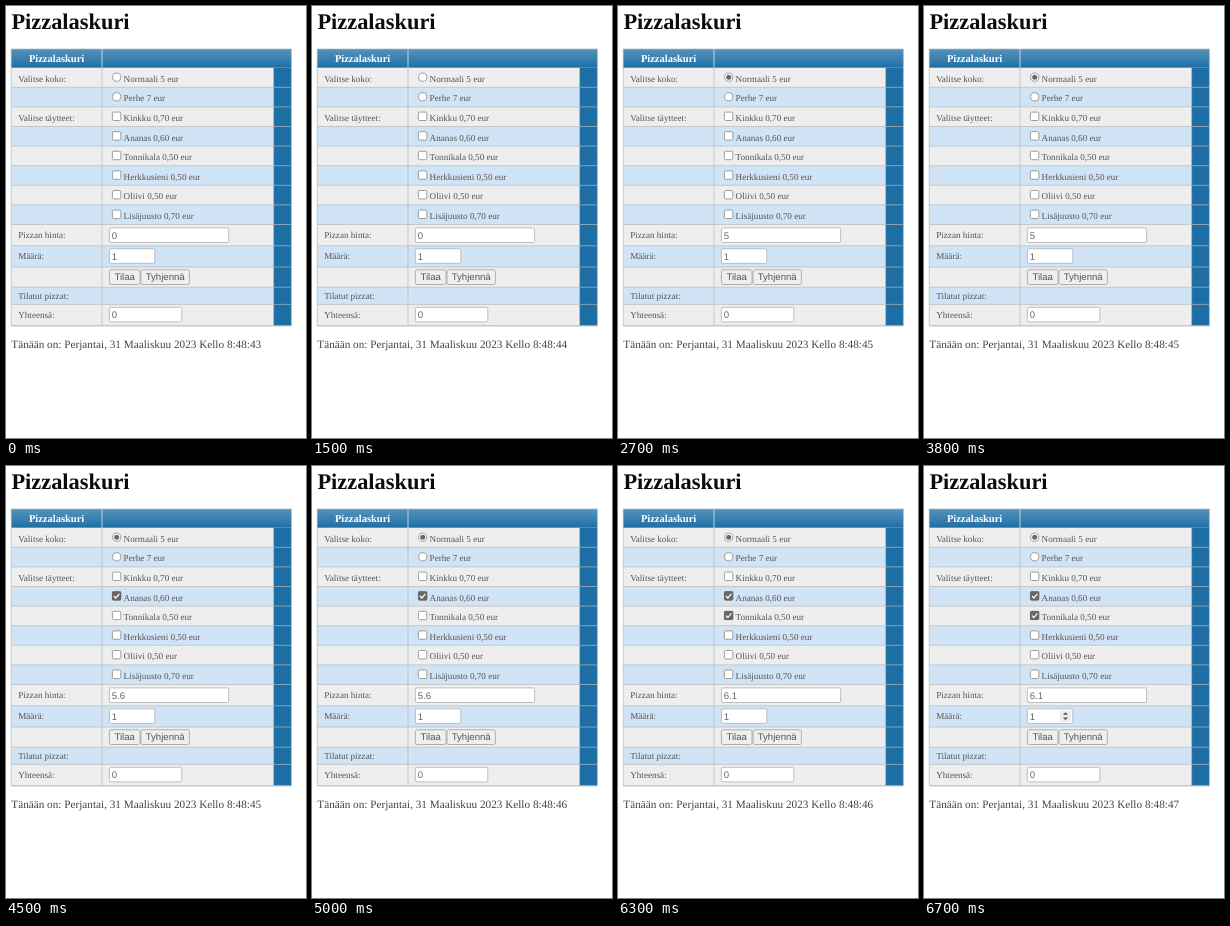
Write an HTML page that moves like this. It is 300 px wide and 432 px high and loops after 8 s.

```html
<!DOCTYPE html>
<html lang="fi">
<head>
<meta charset="utf-8">
<title>Pizzalaskuri</title>
<style>
  html, body { margin: 0; width: 100%; height: 100%; overflow: hidden; background: #fff; }
  svg { display: block; width: 300px; height: 432px; text-rendering: geometricPrecision; }
  text { font-family: "Liberation Serif", "Times New Roman", serif; fill: #555; }
  .title { font-size: 22.4px; font-weight: bold; fill: #0c0c0c; }
  .head { font-size: 10.5px; font-weight: bold; fill: #fff; text-anchor: middle; }
  .cell { font-size: 9.15px; }
  .date { font-size: 11.22px; fill: #444; }
  .field { font: 9.6px "Liberation Sans", Arial, sans-serif; fill: #666; }
  .button { font: 9.6px "Liberation Sans", Arial, sans-serif; fill: #555; text-anchor: middle; }
  .line { stroke: #b4b8bb; stroke-width: .7; fill: none; }
  .box { fill: #fff; stroke: #888; stroke-width: .8; }
  .input { fill: #fff; stroke: #b0b0b0; stroke-width: .8; }
  .press { fill: #efefef; stroke: #a0a0a0; stroke-width: .8; }
  .on { fill: #686868; }
  .tick { fill: none; stroke: #fff; stroke-width: 1.2; }
</style>
</head>
<body>
<svg viewBox="0 0 300 432">
  <defs>
    <linearGradient id="bar" x2="0" y2="1">
      <stop stop-color="#5592bb"/>
      <stop offset=".66" stop-color="#327cad"/>
      <stop offset="1" stop-color="#1c6ea4"/>
    </linearGradient>
  </defs>
  <text class="title" x="5.4" y="22.6">Pizzalaskuri</text>
  <g id="table"></g>
  <g id="spinner" visibility="hidden">
    <rect x="136" y="244.6" width="11" height="11.2" fill="#ececec"/>
    <path d="M139 248.8l2.5-2.6 2.5 2.6zM139 251.6l2.5 2.6 2.5-2.6z" fill="#555"/>
  </g>
  <text class="date" x="5.3" y="341.8">Tänään on: Perjantai, 31 Maaliskuu 2023 Kello 8:48:<tspan id="sec">43</tspan></text>
</svg>
<script>
const LOOP = 8000, TOP = 61.7, STEP = 19.6;
const LEFT = 5.2, SPLIT = 96, SIDE = 267.6, RIGHT = 285.4, BOTTOM = 319.8;
const table = document.getElementById('table');

function add(tag, attrs, content = '') {
  const el = document.createElementNS('http://www.w3.org/2000/svg', tag);
  for (const key in attrs) el.setAttribute(key, attrs[key]);
  el.textContent = content;
  table.append(el);
  return el;
}
const rect = (x, y, width, height, extra) => add('rect', { x, y, width, height, ...extra });
const label = (cls, x, y, content) => add('text', { class: cls, x, y }, content);
const path = (cls, d) => add('path', { class: cls, d });

// Table background and grid
const edges = Array.from({ length: 9 }, (_, i) => TOP + i * STEP).concat(239.8, 261, 281.2, 298.4, BOTTOM);
edges.slice(0, -1).forEach((y, i) =>
  rect(LEFT, y, SIDE - LEFT, edges[i + 1] - y, { fill: i % 2 ? '#d0e4f5' : '#eee' }));
rect(SIDE, TOP, RIGHT - SIDE, BOTTOM - TOP, { fill: '#1c6ea4' });
rect(LEFT, 43, RIGHT - LEFT, TOP - 43, { fill: 'url(#bar)' });
edges.slice(1).forEach(y => path('line', `M${LEFT} ${y}H${RIGHT}`));
path('line', `M${SPLIT} ${TOP}V${BOTTOM}M${SIDE} ${TOP}V${BOTTOM}`);
path('line', `M${LEFT} 43H${RIGHT}V${BOTTOM}H${LEFT}Z`);
rect(SPLIT - .5, 43, 1, TOP - 43, { fill: '#b9d4e8' });
label('head', 50.6, 55.5, 'Pizzalaskuri');

// Row labels
[['Valitse koko:', 75.8], ['Valitse täytteet:', 115], ['Pizzan hinta:', 232.4],
 ['Määrä:', 252.6], ['Tilatut pizzat:', 292.8], ['Yhteensä:', 311.8]]
  .forEach(([s, y]) => label('cell', 12.2, y, s));

// Options: two radios, then checkboxes
const marks = ['Normaali 5 eur', 'Perhe 7 eur', 'Kinkku 0,70 eur', 'Ananas 0,60 eur',
  'Tonnikala 0,50 eur', 'Herkkusieni 0,50 eur', 'Oliivi 0,50 eur', 'Lisäjuusto 0,70 eur'].map((s, i) => {
  const y = 71.2 + i * STEP;
  label('cell', 117.6, y + 4.6, s);
  if (i < 2) {
    add('circle', { class: 'box', cx: 110.7, cy: y, r: 4.1 });
    return [add('circle', { class: 'on', cx: 110.7, cy: y, r: 2.5 })];
  }
  rect(106.4, y - 4.3, 8.4, 8.4, { class: 'box', rx: 1.2 });
  return [rect(106, y - 4.7, 9.2, 9.2, { class: 'on', rx: 1.4 }),
    path('tick', `M107.9 ${y}l1.9 2 3.6-4.2`)];
});

// Fields and buttons
const field = (y, w, s) => {
  rect(103.4, y, w, 14.6, { class: 'input', rx: 1.4 });
  return label('field', 105.7, y + 10.8, s);
};
const price = field(221.9, 119.2, '0');
field(242.8, 45.4, '1');
field(301.3, 72.4, '0');
[[103.4, 30.6, 'Tilaa'], [135, 48.4, 'Tyhjennä']].forEach(([x, w, s]) => {
  rect(x, 263.8, w, 14.7, { class: 'press', rx: 1.8 });
  label('button', x + w / 2, 274.3, s);
});

const sec = document.getElementById('sec');
const spinner = document.getElementById('spinner');
const ticks = [600, 2600, 4600, 6600];
const picks = [{ at: 2300, row: 0, cost: 5 }, { at: 4500, row: 3, cost: .6 }, { at: 6300, row: 4, cost: .5 }];
const show = (el, on) => el.setAttribute('visibility', on ? 'visible' : 'hidden');

function draw(now) {
  const t = now % LOOP;
  const chosen = picks.filter(p => t >= p.at);
  sec.textContent = 43 + ticks.filter(at => t >= at).length;
  price.textContent = +chosen.reduce((sum, p) => sum + p.cost, 0).toFixed(1);
  marks.forEach((parts, row) => parts.forEach(el => show(el, chosen.some(p => p.row === row))));
  show(spinner, t >= 6700);
}
const start = performance.now();
function frame() {
  draw(performance.now() - start);
  requestAnimationFrame(frame);
}
frame();
</script>
</body>
</html>
```
